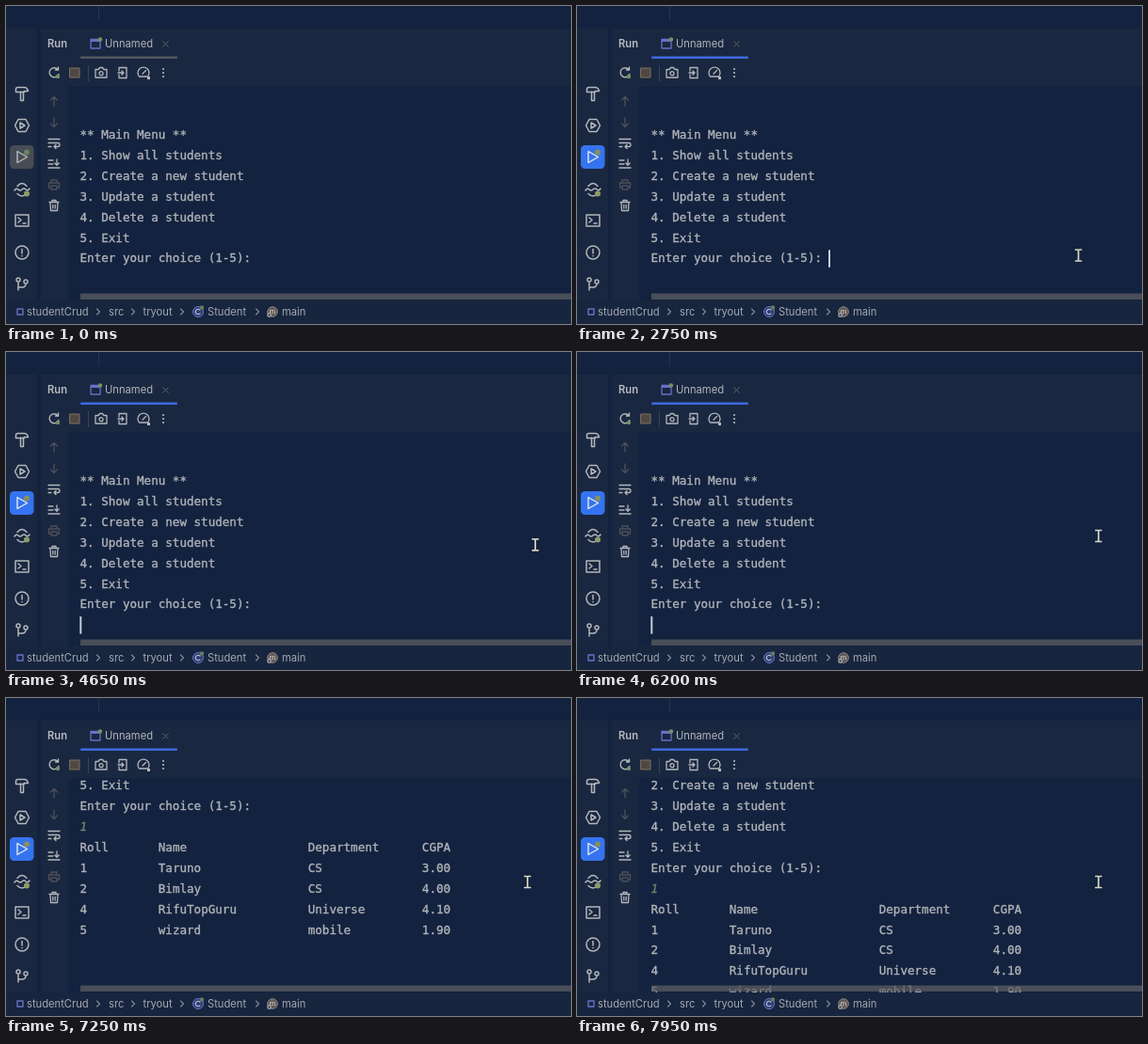
These frames come from a looping animation (600x338 px, 8000 ms). An HTML page with a canvas:

```html
<!DOCTYPE html>
<html lang="en">
<head>
<meta charset="utf-8">
<title>Run console</title>
<style>
html, body { margin: 0; width: 100%; height: 100%; overflow: hidden; background: #13223f; }
canvas { display: block; width: 600px; height: 338px; }
</style>
</head>
<body>
<canvas id="stage"></canvas>
<script>
const LOOP = 8000, W = 600, H = 338;
const canvas = document.getElementById('stage');
const ctx = canvas.getContext('2d');
const scale = window.devicePixelRatio || 1;
canvas.width = W * scale;
canvas.height = H * scale;

const COLOR = {
  base: '#13223f', panel: '#1a2740', edge: '#13213b',
  text: '#b0b3b7', ui: '#a4a8af', icon: '#b4b7bb', dim: '#4d5058',
  input: '#71836f', blue: '#3574f0', line: '#3c69dc', violet: '#6a70c6',
  caret: '#c6cddc', bar: '#4b4e54', green: '#74905f'
};
const MONO = '12.57px "DejaVu Sans Mono", monospace';
const UI = '11.2px Inter, sans-serif';
const LEFT = 79, CHAR = 7.57, LINE = 21.9, TOP = 137;

const MENU = [
  '** Main Menu **', '1. Show all students', '2. Create a new student',
  '3. Update a student', '4. Delete a student', '5. Exit',
  'Enter your choice (1-5):'
];
const TABLE = [
  ['Roll', 'Name', 'Department', 'CGPA'],
  ['1', 'Taruno', 'CS', '3.00'],
  ['2', 'Bimlay', 'CS', '4.00'],
  ['4', 'RifuTopGuru', 'Universe', '4.10'],
  ['5', 'wizard', 'mobile', '1.90']
];
const COLUMNS = [0, 11, 32, 48];

// Event times in ms
const FOCUS = 1550, TYPED = 3050, ENTERED = 4250;
const CARET_ON = [[1550, 2100], [2700, 3050], [3050, 3500], [4250, 4750], [5150, 5650], [6200, 8000]];
// Each wheel notch moves three lines: [start, duration]
const NOTCHES = [[6250, 210], [6730, 210], [7020, 210], [7480, 210]];
// Pointer path: [time, x, y]
const POINTER = [
  [1100, 606, 214], [1250, 578, 236], [1450, 533, 264], [1500, 532.5, 265],
  [4250, 532.5, 265], [4650, 562, 205], [5000, 597, 131],
  [5150, 597, 131], [5400, 553.8, 195.5], [8000, 553.8, 195.5]
];

const clamp = v => Math.max(0, Math.min(1, v));
const ease = v => v * v * (3 - 2 * v);

function rect(x, y, w, h, color, r = 0) {
  ctx.fillStyle = color;
  ctx.beginPath();
  ctx.roundRect(x, y, w, h, r);
  ctx.fill();
}

function disc(x, y, r, color) {
  ctx.fillStyle = color;
  ctx.beginPath();
  ctx.arc(x, y, r, 0, Math.PI * 2);
  ctx.fill();
}

// A positive weight thickens the letters with an outline
function label(str, x, y, color = COLOR.ui, font = UI, weight = 0) {
  ctx.font = font;
  ctx.fillStyle = ctx.strokeStyle = color;
  ctx.fillText(str, x, y);
  if (weight) {
    ctx.lineWidth = weight;
    ctx.lineJoin = 'round';
    ctx.strokeText(str, x, y);
  }
}

// Strokes an SVG path centred on x, y
function icon(x, y, d, color = COLOR.icon, width = 1.3) {
  ctx.save();
  ctx.translate(x, y);
  ctx.strokeStyle = color;
  ctx.lineWidth = width;
  ctx.lineCap = ctx.lineJoin = 'round';
  ctx.stroke(new Path2D(d));
  ctx.restore();
}

const RING = r => `M${-r} 0a${r} ${r} 0 1 0 ${2 * r} 0a${r} ${r} 0 1 0 ${-2 * r} 0`;

function drawPanels() {
  rect(0, 0, W, H, COLOR.base);
  rect(0, 24, 33, 289, COLOR.panel);
  rect(37, 24, 563, 61, COLOR.panel);
  rect(37, 85, 29, 228, COLOR.panel);
  rect(0, 313, W, 25, '#17253f');
  rect(33, 23, 567, 1, COLOR.edge);
  rect(98, 0, 1, 15, '#28344a');
}

function drawSidebar(focused) {
  icon(17, 93, 'M-6.5 -2.5v-2q0 -2 2 -2h7q3 0 4 4h-4v1h-9zM-1.5 -2v9.5h3v-9.5', COLOR.icon, 1.5);
  icon(17, 127, 'M-4 -6.5h8l3.5 6.5l-3.5 6.5h-8l-3.5 -6.5zM-2 -3l5 3l-5 3z', COLOR.icon, 1.5);

  rect(4, 148, 25.5, 25, focused ? COLOR.blue : '#484c54', 4.5);
  icon(17, 160.5, 'M-5 -6l10.5 6l-10.5 6z', focused ? '#e4e9f2' : '#b6b9bb', 1.4);
  disc(22, 155.5, 3, focused ? '#8a8f5c' : '#66835c');

  icon(17, 195, 'M-5 -3.5q5 -6 10 0M-8 1q2 -3 4 -1t4 0t4 0t4 -1M-5 4.5q5 5 10 0', COLOR.icon, 1.5);
  disc(22, 199.5, 3, '#8f9b64');
  icon(17, 228, 'M-7 -6h14v12h-14zM-4 -3l3 2.5l-3 2.5M1 3h3', COLOR.icon, 1.5);
  icon(17, 262, RING(7) + 'M0 -3.5v4.5M0 3.6v.2', COLOR.icon, 1.5);
  icon(17, 296, 'M-4 -3v9M-6 -5a2 2 0 1 0 4 0a2 2 0 1 0 -4 0M2 -3a2 2 0 1 0 4 0a2 2 0 1 0 -4 0M4 -1q0 4 -4 4h-4', COLOR.icon, 1.5);
}

function drawHeader(focused) {
  label('Run', 44, 43.6, '#b9bcc0', '600 ' + UI);
  icon(95, 40, 'M-5 -4.5h10v9.5h-10z', COLOR.violet, 1.3);
  rect(90, 35, 10, 3, COLOR.violet);
  disc(100, 35.5, 2.2, COLOR.green);
  label('Unnamed', 105, 43.6, '#b3b6ba');
  icon(169.5, 40.5, 'M-2.8 -2.8l5.6 5.6M2.8 -2.8l-5.6 5.6', '#62615f', 1);
  rect(79, 53.5, 103, 2.5, focused ? COLOR.line : '#53575f', 1);

  icon(51, 71, 'M4 -3.5a5 5 0 1 0 .8 5M4.5 -6v3h-3', COLOR.icon, 1.4);
  rect(53, 73, 4, 4, COLOR.green, 1);
  rect(68, 66, 10, 10, '#4f4843', 1);
  icon(73, 71, 'M-5 -5h10v10h-10z', '#81705f', 1);
  rect(87, 63, 1, 17, '#3a4352');
  icon(101, 71, 'M-6 -3.5h3l1.5 -2h3l1.5 2h3v8.5h-12zM-2 .7a2 2 0 1 0 4 0a2 2 0 1 0 -4 0');
  icon(124, 71, 'M-4 -2v-3.5h8v11h-8v-3.5M-5 0h6M-1 -2l2 2l-2 2');
  icon(146, 71, 'M-4.5 4a6 6 0 1 1 9 0zM-1 1l3.5 -3.5');
  rect(150, 75, 3, 3, COLOR.icon);
  for (const dy of [-4, 0, 4]) disc(167, 71 + dy, 1.1, COLOR.icon);
}

function drawConsoleTools() {
  icon(51, 101, 'M0 5v-9M-3.5 -1l3.5 -3.5l3.5 3.5', COLOR.dim);
  icon(51, 124, 'M0 -5v9M-3.5 1l3.5 3.5l3.5 -3.5', COLOR.dim);
  icon(51, 146, 'M-6 -4.5h12M-6 -.5h10q2 0 2 2t-2 2h-4M2 1.5l-2 2l2 2M-6 3.5h3');
  icon(51, 168, 'M-6 -4h5M-6 0h5M-6 4h12M3 -5v6M.8 -1l2.2 2.2l2.2 -2.2');
  icon(51, 190, 'M-3 -2v-3h6v3M-3 3h-2.5v-5h11v5h-2.5M-3 1h6v4h-6z', COLOR.dim);
  icon(51, 212, 'M-5 -3.5h10M-2 -3.5v-2h4v2M-4 -3.5l.5 9h7l.5 -9M-1.2 -.5v3.5M1.2 -.5v3.5');
}

function drawBreadcrumbs() {
  const base = 328.8;
  icon(15, 325, 'M-3 -3h6v6h-6z', COLOR.violet, 1.4);
  label('studentCrud', 22, base);
  label('src', 109, base);
  label('tryout', 145.5, base);
  label('Student', 214, base);
  label('main', 293, base);
  for (const x of [98, 135, 187, 267]) icon(x, 325, 'M-1.5 -3l3 3l-3 3', '#8a8e96', 1.1);
  disc(204, 325, 5.8, '#2f3f70');
  icon(204, 325, RING(5.5), COLOR.violet, 1);
  icon(204, 325, 'M2 -1.8a2.7 2.7 0 1 0 0 3.6', '#b8c3d8', 1.1);
  rect(206, 318.5, 4, 4, '#5e815e', 1);
  disc(283, 325, 5.5, '#5b5655');
  icon(283, 325, RING(5.3), '#8f837d', 1);
  icon(283, 325, 'M-2.5 2v-3.5M-2.5 -1q2.5 -2 2.5 .5v2.5M0 -1q2.5 -2 2.5 .5v2.5', '#c0b9b2', 1);
  disc(279.5, 328.5, 2.4, '#a3a5a6');
  disc(279.5, 328.5, .9, COLOR.base);
}

function scrollAt(t) {
  return NOTCHES.reduce((sum, [start, span]) => sum + 3 * ease(clamp((t - start) / span)), 0) * LINE;
}

function drawConsole(t) {
  const scroll = scrollAt(t);
  const rowY = row => TOP + row * LINE + scroll;
  const put = (str, col, row, color = COLOR.text, font = MONO) => {
    const y = rowY(row);
    if (y > 70 && y < 325) label(str, LEFT - .5 + col * CHAR, y + 4, color, font, .35);
  };
  const putMenu = first => MENU.forEach((str, i) => put(str, 0, first + i));
  const putInput = row => put('1', 0, row, COLOR.input, 'italic ' + MONO);

  ctx.save();
  ctx.beginPath();
  ctx.rect(66, 85, 534, 228);
  ctx.clip();
  putMenu(0);
  if (t >= ENTERED) {
    putMenu(-16);
    putInput(-9);
    TABLE.forEach((cells, i) => cells.forEach((cell, c) => put(cell, COLUMNS[c], i - 8)));
  } else if (t >= TYPED) {
    putInput(7);
  }
  if (CARET_ON.some(([from, to]) => t >= from && t < to)) {
    const row = t < TYPED ? 6 : 7;
    const x = t < TYPED ? 267 : t < ENTERED ? 84.5 : 78.3;
    rect(x, rowY(row) - 9.2, 2, 18.5, COLOR.caret);
  }
  ctx.globalAlpha = .75;
  rect(79, 305.5, 521, 6.5, '#5b5c60');
  ctx.restore();
}

function drawPointer(t) {
  const next = POINTER.findIndex(p => p[0] > t);
  if (next < 1) return;
  const [t0, x0, y0] = POINTER[next - 1];
  const [t1, x1, y1] = POINTER[next];
  const k = (t - t0) / (t1 - t0);
  const x = x0 + (x1 - x0) * k, y = y0 + (y1 - y0) * k;
  const beam = 'M-3 -6h2q1 0 1 1q0 -1 1 -1h2M0 -5v10M-3 6h2q1 0 1 -1q0 1 1 1h2';
  icon(x, y, beam, '#17233a', 3);
  icon(x, y, beam, '#d8d7c6', 1.7);
}

function draw(t) {
  const focused = t >= FOCUS;
  ctx.setTransform(scale, 0, 0, scale, 0, 0);
  drawPanels();
  drawSidebar(focused);
  drawHeader(focused);
  drawConsoleTools();
  drawConsole(t);
  drawBreadcrumbs();
  drawPointer(t);
}

const began = performance.now();
function tick() {
  draw((performance.now() - began) % LOOP);
  requestAnimationFrame(tick);
}
tick();
</script>
</body>
</html>
```
